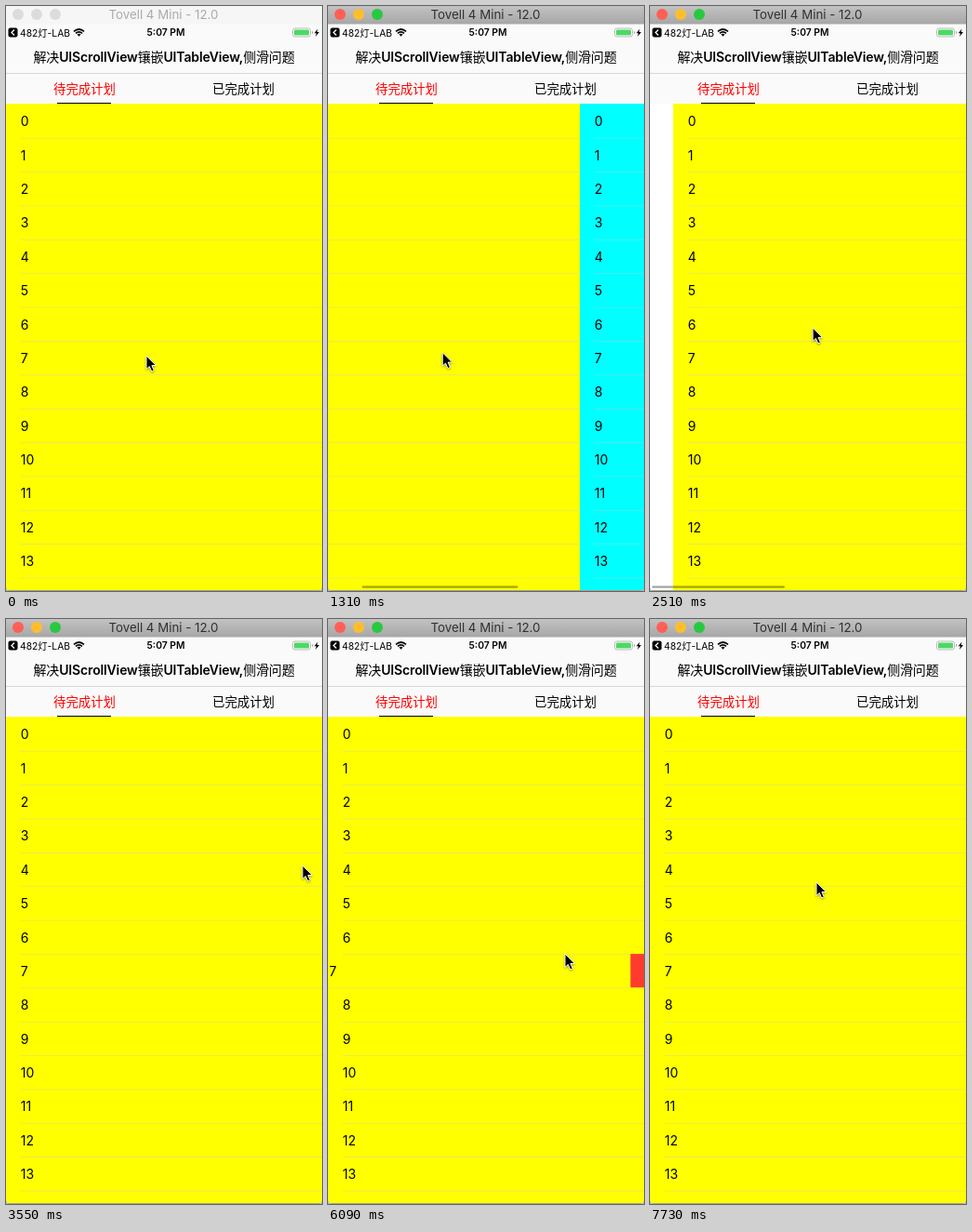
Animation of 340x629 px, one loop 8 s. Source, as an HTML page:

```html
<!DOCTYPE html>
<html lang="zh">
<head>
<meta charset="utf-8">
<style>
  html, body { margin: 0; width: 100%; height: 100%; overflow: hidden; background: #fff; }
  svg { display: block; width: 340px; height: 629px; }
  text { font-family: Inter, "Noto Sans CJK SC", "Noto Sans CJK", sans-serif; }
  .mid { text-anchor: middle; }
  .title { font-size: 14px; font-weight: 500; letter-spacing: -.14px; }
  .title tspan { font-weight: 600; }
  .tab { font-size: 13.4px; }
</style>
</head>
<body>
<svg viewBox="0 0 340 629">
  <defs>
    <linearGradient id="metal" x2="0" y2="1">
      <stop stop-color="#c2c2c2"/><stop offset="1" stop-color="#a6a6a6"/>
    </linearGradient>
    <clipPath id="content"><rect y="105" width="340" height="523"/></clipPath>
  </defs>

  <rect width="340" height="629" fill="#fafafa"/>
  <rect id="bar" width="340" height="19.5"/>
  <g id="lights">
    <circle cx="13" cy="9" r="6"/><circle cx="33" cy="9" r="6"/><circle cx="53" cy="9" r="6"/>
  </g>
  <text id="device" class="mid" x="169.5" y="14" font-size="13.3">Tovell 4 Mini - 12.0</text>

  <rect x="2.5" y="23.5" width="10" height="10" rx="2"/>
  <path d="M9 25.5 6 28.5 9 31.5" fill="none" stroke="#fff" stroke-width="1.3"/>
  <text x="15" y="32.5" font-size="10.3">482灯-LAB</text>
  <path d="M73 27.4Q78.5 22.6 84 27.4M75 29.4Q78.5 26.4 82 29.4" fill="none" stroke="#000" stroke-width="1.7"/>
  <path d="M76.5 30.6Q78.5 29.1 80.5 30.6L78.5 32.8Z"/>
  <text class="mid" x="172" y="32.3" font-size="10.3" font-weight="600">5:07 PM</text>
  <rect x="308.5" y="24" width="19" height="9" rx="2.5" fill="#fff" stroke="#aaa" stroke-width=".8"/>
  <rect x="310" y="25.5" width="16" height="6" rx="1.2" fill="#4cd964"/>
  <path d="M329 27v3q1.4-.4 1.4-1.5T329 27Z" fill="#aaa"/>
  <path d="M335.5 24.5 331.8 29.2H334L333 33 337 27.9H334.6Z"/>

  <text class="mid title" x="170" y="60">解决<tspan>UIScrollView</tspan>镶嵌<tspan>UITableView,</tspan>侧滑问题</text>
  <rect y="72" width="340" height="1" fill="#d8d8d8"/>
  <text class="mid tab" x="84.5" y="94" fill="#f00">待完成计划</text>
  <text class="mid tab" x="255.5" y="94">已完成计划</text>
  <rect x="55" y="104" width="58" height="1"/>

  <g clip-path="url(#content)">
    <rect y="105" width="340" height="524" fill="#fff"/>
    <g id="pages"></g>
    <rect id="scroller" y="623.5" height="2.2" rx="1.1" opacity=".36"/>
  </g>
  <rect y="628" width="340" height="1" fill="#a5a58c"/>
  <path d="M0 624v5h5Q0 629 0 624ZM340 624v5h-5Q340 629 340 624Z" fill="#bbb"/>

  <path id="cursor" d="M0 0V14.5L3.3 11.5 5.7 17 8.3 15.9 5.9 10.5H10.4Z"
        stroke="#fff" style="filter:drop-shadow(0 1px 1px #0006)"/>
</svg>
<script>
const LOOP = 8000, START = 562, STEP = 149.2; // the screen refreshes once per STEP
const TOP = 105.5, ROW = 36.37, WIDTH = 340;
const byId = id => document.getElementById(id);
const clamp = v => Math.min(1, Math.max(0, v));

// Pointer strokes: the steps each one spans and where it ends.
const home = { x: 151, y: 376 };
const strokes = [
  { from: 0, to: 2, x: 107, y: 378 },
  { from: 2, to: 7, x: 134, y: 369 },
  { from: 11, to: 20, x: 319, y: 265 },
  { from: 22, to: 29, x: 289, y: 274 },
  { from: 29, to: 33, x: 266, y: 360 },
  { from: 36, to: 41, x: 211, y: 360 },
  { from: 42, to: 48, x: 179, y: 283 }
];

function pointer(step) {
  let { x, y } = home;
  for (const s of strokes) {
    const f = clamp((step - s.from) / (s.to - s.from));
    x += (s.x - x) * f;
    y += (s.y - y) * f;
  }
  return [x, y];
}

// Eases out to a peak, may hold there, and springs back to zero.
function pull(step, from, to, ramp, peak) {
  return peak * Math.sin(Math.PI / 2 * clamp(Math.min(step - from, to - step) / ramp));
}
const pageOffset = step => pull(step, 1.17, 8, 3.4, 70) - pull(step, 11, 19, 4, 36);
const rowShift = {
  4: step => pull(step, 22, 30, 4, 30),
  7: step => pull(step, 36, 46, 4, 38)
};

function page(x, color) {
  let rows = '';
  for (let i = 0; i < 14; i++) {
    const y = TOP + i * ROW;
    rows += `<g class="row"><text x="15.7" y="${y + 23.8}" font-size="14">${i}</text>
      <rect x="15.5" y="${y + ROW}" width="${WIDTH - 15.5}" height=".7" fill="#c8c7cc" opacity=".5"/>
      <rect class="action" x="${WIDTH}" y="${y}" width="0" height="${ROW - .3}" fill="#ff3b30"/></g>`;
  }
  return `<g transform="translate(${x})"><rect y="105" width="${WIDTH}" height="524" fill="${color}"/>${rows}</g>`;
}
byId('pages').innerHTML = page(0, '#ff0') + page(WIDTH, '#0ff');
const rows = document.querySelectorAll('.row');
const lights = [...byId('lights').children];

function draw(now) {
  const step = Math.floor((now % LOOP - START) / STEP);
  const active = step >= 0;
  byId('bar').setAttribute('fill', active ? 'url(#metal)' : '#f6f6f6');
  byId('device').setAttribute('fill', active ? '#303030' : '#aaa');
  lights.forEach((light, i) =>
    light.setAttribute('fill', active ? ['#ff5f57', '#ffbd2e', '#28c940'][i] : '#dcdcdc'));

  const offset = Math.round(pageOffset(step));
  byId('pages').setAttribute('transform', `translate(${-offset})`);
  byId('scroller').setAttribute('x', 2 + Math.max(0, offset) / 2);
  byId('scroller').setAttribute('width', offset ? 168 + Math.min(0, offset) : 0);

  for (const i in rowShift) {
    const shift = rowShift[i](step);
    rows[i].setAttribute('transform', `translate(${-shift})`);
    rows[i].querySelector('.action').setAttribute('width', shift);
  }
  byId('cursor').setAttribute('transform', `translate(${pointer(step)})`);
}

const begin = performance.now();
function tick() {
  draw(performance.now() - begin);
  requestAnimationFrame(tick);
}
tick();
</script>
</body>
</html>
```
